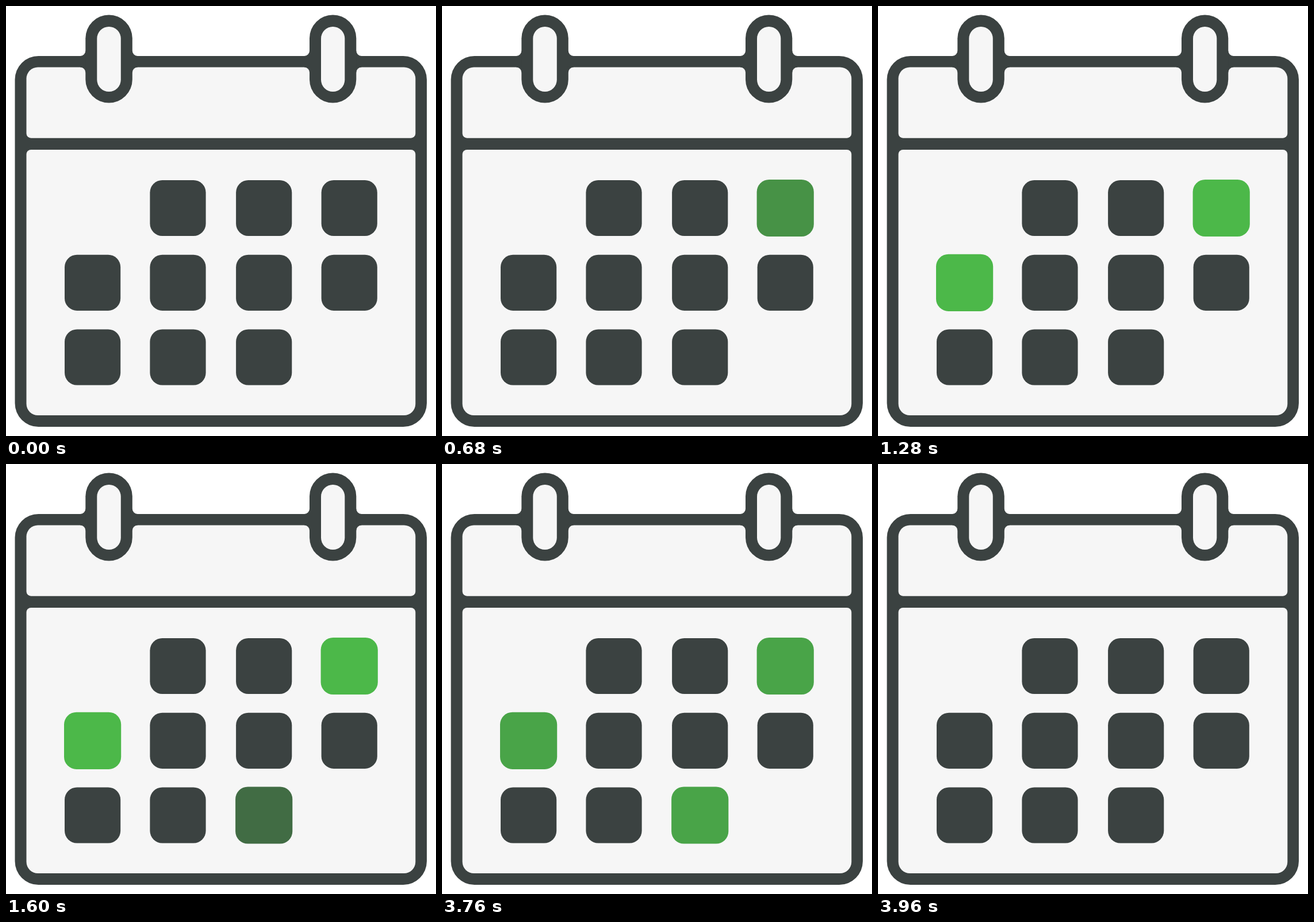
Animation, 748 px wide and 748 px high, one loop 4 s. Source, as an HTML page with a canvas:

```html
<!DOCTYPE html>
<html lang="en">
<head>
<meta charset="utf-8">
<title>Calendar</title>
<style>
html, body { margin: 0; width: 100%; height: 100%; overflow: hidden; background: #fff; }
canvas { display: block; width: 748px; height: 748px; }
</style>
</head>
<body>
<canvas id="stage" width="748" height="748"></canvas>
<script>
const ctx = document.getElementById('stage').getContext('2d');
const LOOP = 4000, STEP = 40;
const DARK = [59, 66, 65], GREEN = [76, 184, 73], PAPER = '#f6f6f6';
const INK = `rgb(${DARK})`;
const COLUMNS = [150.6, 299, 448.7, 597.2];
const ROWS = [351.5, 481.3, 611];
// Highlighted days: column, row, fade start, fade end
const MARKS = [[3, 0, 510, 760], [0, 1, 1010, 1280], [2, 2, 1510, 1760]];
const FADE_OUT = [3720, 3960];

const ramp = (t, from, to) => Math.min(1, Math.max(0, (t - from) / (to - from)));

function box(left, top, right, bottom, radius, color) {
  ctx.fillStyle = color;
  ctx.beginPath();
  ctx.roundRect(left, top, right - left, bottom - top, radius);
  ctx.fill();
}

// Rounds off an inside corner; dx and dy point into the open area.
function fillet(x, y, dx, dy, r) {
  ctx.fillStyle = INK;
  ctx.beginPath();
  ctx.moveTo(x - dx, y - dy);
  ctx.lineTo(x + dx * r, y - dy);
  ctx.lineTo(x + dx * r, y);
  ctx.arcTo(x, y, x, y + dy * r, r);
  ctx.lineTo(x - dx, y + dy * r);
  ctx.fill();
}

function ring(left, right) {
  box(left, 15.5, right, 168.5, 41, INK);
  for (const [x, dx] of [[left, -1], [right, 1]]) {
    fillet(x, 87, dx, -1, 9);
    fillet(x, 106.5, dx, 1, 9);
  }
  box(left + 20, 36, right - 20, 149, 21, PAPER);
}

function day(column, row, amount) {
  const half = amount > 0 ? 49.6 : 48.6;
  const x = COLUMNS[column], y = ROWS[row];
  const color = DARK.map((c, i) => Math.round(c + (GREEN[i] - c) * amount));
  box(x - half, y - half, x + half, y + half, 21.5, `rgb(${color})`);
}

function draw(t) {
  ctx.fillStyle = '#fff';
  ctx.fillRect(0, 0, 748, 748);
  box(15.5, 87, 732, 732, 41, INK);
  box(35.5, 106.5, 712.3, 229.7, [20, 20, 8, 8], PAPER);
  box(35.5, 250, 712.3, 712, [8, 8, 20, 20], PAPER);
  ring(138.3, 219.8);
  ring(528, 609.3);

  const remaining = 1 - ramp(t, ...FADE_OUT);
  for (let row = 0; row < 3; row++) {
    for (let column = 0; column < 4; column++) {
      if (row + column === 0 || row + column === 5) continue;
      const mark = MARKS.find(m => m[0] === column && m[1] === row);
      day(column, row, mark ? ramp(t, mark[2], mark[3]) * remaining : 0);
    }
  }
}

const start = performance.now();
function tick() {
  const t = (performance.now() - start) % LOOP;
  draw(Math.floor(t / STEP) * STEP);
  requestAnimationFrame(tick);
}
tick();
</script>
</body>
</html>
```
